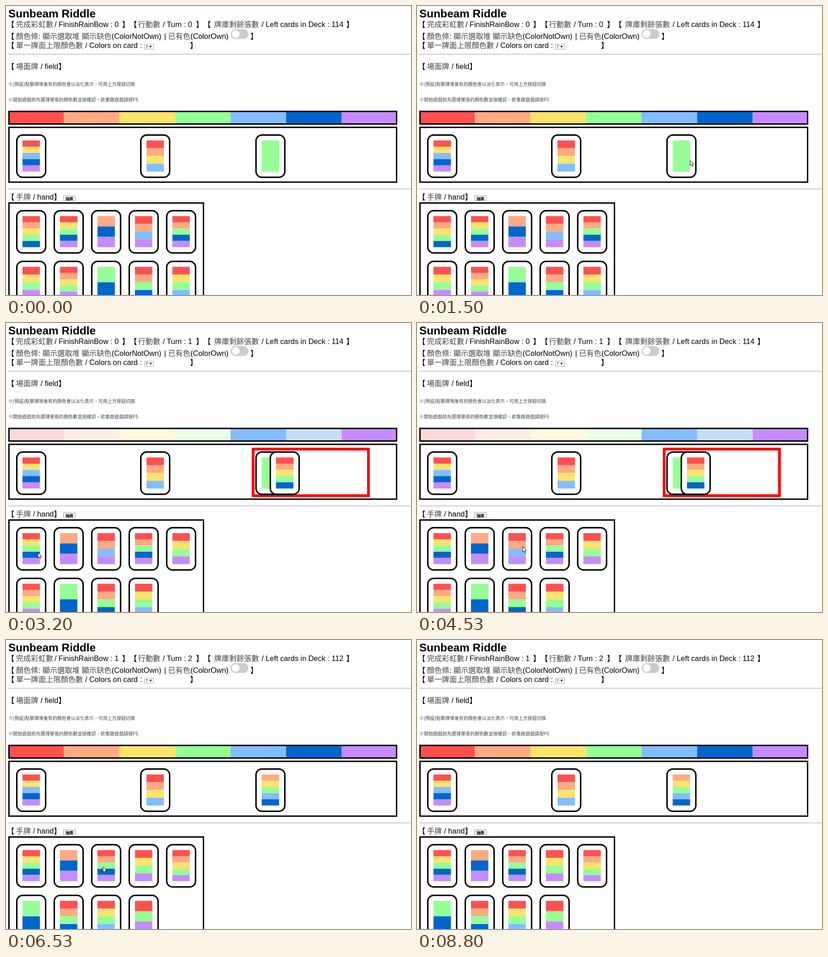
Write an HTML page that moves like this. It is 885 px wide and 633 px high and loops after 8.83 s.

```html
<!DOCTYPE html>
<html lang="zh-Hant">
<head>
<meta charset="utf-8">
<title>Sunbeam Riddle</title>
<style>
  html, body { margin: 0; width: 100%; height: 100%; overflow: hidden; background: #fff; }
  svg { position: absolute; left: 0; top: 0; display: block; }
  text { font-family: "Liberation Sans", Arial, "Noto Sans CJK TC", "Noto Sans CJK", sans-serif; fill: #000; }
  .cjk { font-weight: 300; fill: #444; }
  .frame { fill: none; stroke: #000; stroke-width: 3; }
</style>
</head>
<body>
<svg width="885" height="633" viewBox="0 0 885 633">
  <g id="page"></g>
  <path id="pointer" d="M.5.5V12.2L3.2 9.7 5.2 14 7 13.2 5.1 9H8.6Z" fill="#fff" stroke="#000" stroke-width=".9"/>
</svg>
<script>
const LOOP = 8830;
const COLORS = { R: '#ff5050', O: '#ffaa82', Y: '#fde36c', G: '#95ff95', B: '#83bdff', D: '#0066cc', V: '#c68cff' };
const ORDER = 'ROYGBDV';

const FIRST_HAND = 'ROYGD RYGDV ODV ROBV ROGDV RYGV ROYGV GD ROGD RYGB';
const SECOND_HAND = FIRST_HAND.replace('ROYGD ', '');
const THIRD_HAND = SECOND_HAND.replace('ROBV ', '') + ' RGV';

const STATES = [
  { at: 0, done: 0, turn: 0, deck: 114, pile: ['G'], picked: false, hand: FIRST_HAND },
  { at: 1800, done: 0, turn: 0, deck: 114, pile: ['G'], picked: true, hand: FIRST_HAND },
  { at: 2700, done: 0, turn: 1, deck: 114, pile: ['G', 'ROYGD'], picked: true, hand: SECOND_HAND },
  { at: 5500, done: 1, turn: 2, deck: 112, pile: ['OYGBD'], picked: false, hand: THIRD_HAND }
];

// time, x, y of the pointer tip
const PATH = [
  [350, 850, 640], [1100, 597, 338], [1850, 597, 338], [2350, 48, 492],
  [2720, 48, 492], [3100, 70, 503], [3500, 70, 503], [4250, 231, 490],
  [5650, 231, 490], [6250, 212, 497], [7200, 212, 497], [7900, 520, 640]
];

const rect = (x, y, w, h, extra) => `<rect x="${x}" y="${y}" width="${w}" height="${h}" ${extra}/>`;
const frame = (x, y, w, h) => rect(x + 1.5, y + 1.5, w - 3, h - 3, 'class="frame"');
const text = (x, y, s, size = 16.3, extra = /[\u4e00-\u9fff]/.test(s) ? 'class="cjk"' : '') =>
  `<text x="${x}" y="${y}" font-size="${size}" ${extra}>${s}</text>`;
const line = (y, parts) => parts.map(([x, s]) => text(x, y, s)).join('');
const rule = y => rect(5, y, 885, 1, 'fill="#a8a8a8"') + rect(5, y + 1, 885, 1, 'fill="#eeeeee"');

function card(x, y, stripes) {
  const h = 68 / stripes.length;
  return rect(x + 1.6, y + 1.6, 63, 92.6, 'rx="13" fill="#fff" stroke="#000" stroke-width="3.2"') +
    [...stripes].map((c, i) =>
      rect(x + 14, y + 13.5 + i * h, 38, h, `fill="${COLORS[c]}"`)).join('');
}

function header(s) {
  return text(5, 25, 'Sunbeam Riddle', 24.4, 'font-weight="700"') +
    line(46, [
      [2, '【'], [21.8, '完成彩虹數'], [106, `/ FinishRainBow : ${s.done}`], [253.5, '】'],
      [270, '【'], [288.5, '行動數'], [342.5, `/ Turn : ${s.turn}`], [415, '】'],
      [431.5, '【'], [455, '牌庫剩餘張數'], [558.5, `/ Left cards in Deck : ${s.deck}`], [743.5, '】']
    ]) +
    line(72, [
      [2, '【'], [21.8, '顏色條'], [71, ':'], [79.7, '顯示選取堆'], [165.5, '顯示缺色'], [230.8, '(ColorNotOwn)'],
      [345.5, '|'], [354, '已有色'], [403, '(ColorOwn)'], [534, '】']
    ]) +
    line(92, [[2, '【'], [21.8, '單一牌面上限顏色數'], [173, '/ Colors on card :'], [402, '】']]) +
    rect(491, 50.5, 38.5, 21.8, 'rx="10.9" fill="#ccc"') +
    '<circle cx="502" cy="61.4" r="8.4" fill="#fff"/>' +
    rect(302.5, 83.5, 20, 11, 'fill="#fff" stroke="#a9a9a9"') +
    text(305, 92, '7', 8.5) + '<path d="M313.5 87h5l-2.5 4.5z"/>' +
    rule(105) +
    line(138, [[2, '【'], [21.8, '場面牌'], [75.5, '/ field'], [114.5, '】']]) +
    text(5, 175, '※(預設)點擊牌堆後有的顏色會以淡化表示，可用上方按鈕切換', 10) +
    text(5, 209, '※開始遊戲前先選擇單張的顏色數並按確認，欲重啟遊戲請按F5', 10.08);
}

function field(s) {
  const owned = s.picked ? s.pile.join('') : '';
  const w = 850 / 7;
  const bar = [...ORDER].map((c, i) =>
    rect(5 + i * w, 231, w, 28, `fill="${COLORS[c]}" opacity="${owned.includes(c) ? .22 : 1}"`)).join('');
  return bar + frame(5, 229.4, 850, 30.6) + frame(5, 264.3, 850, 123) +
    card(22, 281, 'RYBDV') + card(293, 281, 'ROYB') +
    (s.picked ? rect(540, 276.2, 252, 102, 'fill="none" stroke="#f00" stroke-width="6"') : '') +
    s.pile.map((c, i) => card(544.7 + i * 31.3, 281, c)).join('');
}

function hand(s) {
  return rule(400) +
    line(424, [[2, '【'], [21.8, '手牌'], [59, '/ hand'], [104.5, '】']]) +
    rect(125.5, 415.5, 26, 12, 'fill="#eee" stroke="#aaa"') +
    text(138.5, 424.8, '抽牌', 8.3, 'text-anchor="middle" font-weight="700"') +
    frame(5, 430, 428, 260) +
    s.hand.split(' ').map((c, i) =>
      card(22 + i % 5 * 81.9, 446.7 + Math.floor(i / 5) * 111, c)).join('');
}

const page = document.getElementById('page');
const pointer = document.getElementById('pointer');
let shown = null;

function movePointer(t) {
  const i = PATH.findIndex(p => p[0] > t);
  pointer.style.display = i > 0 ? '' : 'none';
  if (i < 1) return;
  const [t0, x0, y0] = PATH[i - 1], [t1, x1, y1] = PATH[i];
  const k = (t - t0) / (t1 - t0), e = k * k * (3 - 2 * k);
  pointer.setAttribute('transform', `translate(${x0 + (x1 - x0) * e - .5} ${y0 + (y1 - y0) * e - .5})`);
}

function draw(t) {
  const s = STATES.filter(v => v.at <= t).pop();
  if (s !== shown) {
    page.innerHTML = header(s) + field(s) + hand(s);
    shown = s;
  }
  movePointer(t);
}

const start = performance.now();
function tick() {
  draw((performance.now() - start) % LOOP);
  requestAnimationFrame(tick);
}
tick();
</script>
</body>
</html>
```
